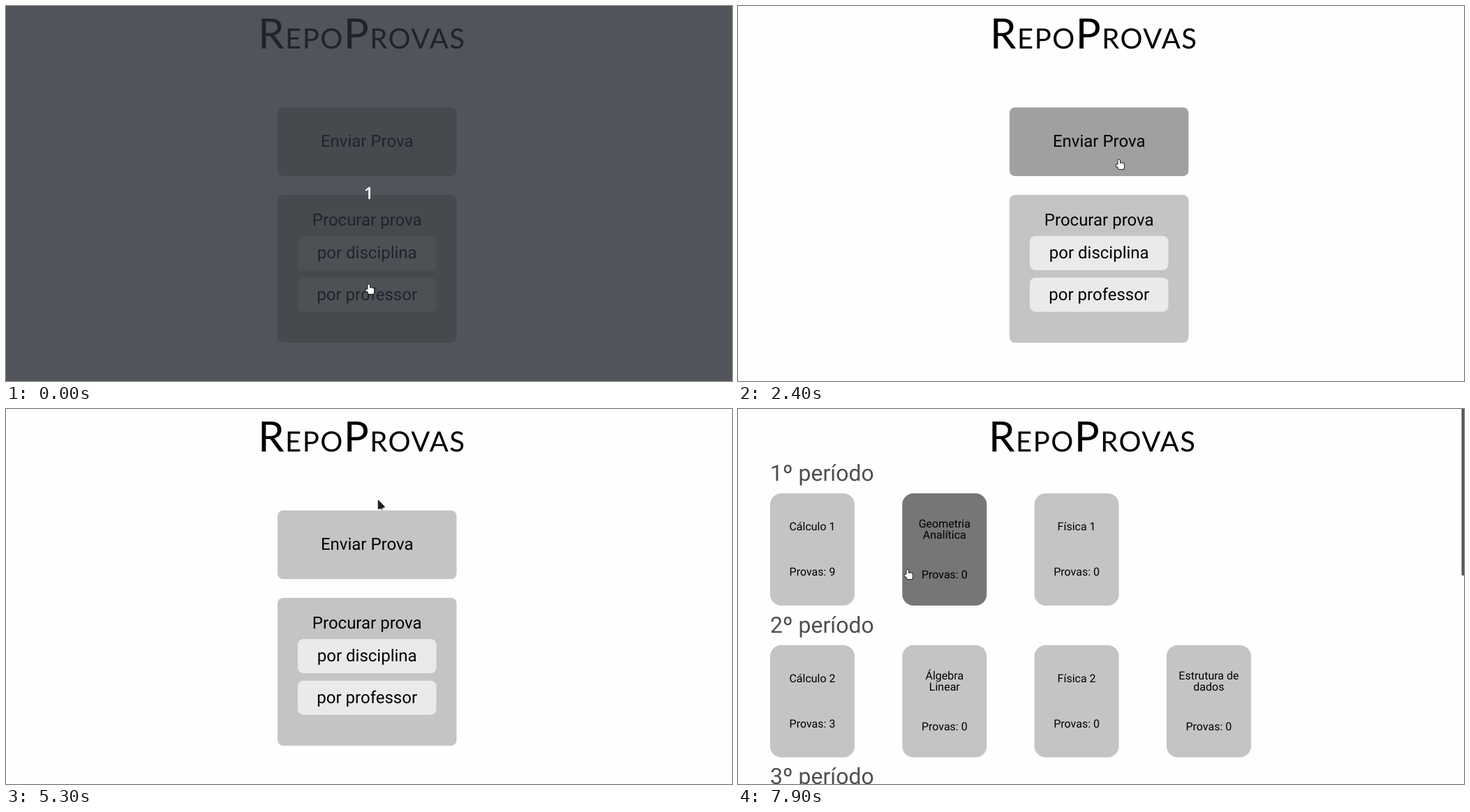
Write an HTML page with a canvas that moves like this. It is 1040 by 538 pixels and loops after 8 s.

```html
<!DOCTYPE html>
<html lang="pt">
<head>
<meta charset="utf-8">
<title>RepoProvas</title>
<style>
  html, body { margin: 0; width: 100%; height: 100%; overflow: hidden; background: #fefefe; }
  canvas { display: block; }
</style>
</head>
<body>
<canvas id="stage" width="1040" height="538"></canvas>
<script>
const ctx = document.getElementById('stage').getContext('2d');
const LOOP = 8000, STEP = 100, MID = 517.2;
const PAPER = '#fefefe', CARD = '#c4c4c2', PILL = '#eaeae8', INK = '#000';
const MENU_HOVER = '#a0a09e', SUBJECT_HOVER = '#767674';

let pointer, hot;

// Pointer strokes: start time, number of steps, destination.
const strokes = [
  [100, 1, 525, 405], [1100, 4, 529, 280], [1600, 4, 537, 350], [2000, 5, 545, 219],
  [3600, 1, 542, 199], [3800, 3, 533, 58], [5200, 8, 531, 351],
  [7200, 3, 504, 328], [7600, 1, 458, 291], [7800, 2, 242, 229]
];

function pointerAt(t) {
  let x = 519, y = 398;
  for (const [start, steps, toX, toY] of strokes) {
    if (t < start) break;
    const k = Math.min(1, ((t - start) / STEP + 1) / steps);
    x += (toX - x) * k;
    y += (toY - y) * k;
  }
  return { x: Math.round(x), y: Math.round(y) };
}

function box(x, y, w, h, radius, fill) {
  ctx.fillStyle = fill;
  ctx.beginPath();
  ctx.roundRect(x, y, w, h, radius);
  ctx.fill();
}

// Text is placed by the vertical centre of its line.
function text(str, x, y, size, { color = INK, align = 'left', font = 'Roboto', weight = 400 } = {}) {
  ctx.font = `${weight} ${size}px "${font}", sans-serif`;
  ctx.fillStyle = color;
  ctx.textAlign = align;
  ctx.fillText(str, x, Math.floor(y + size * 0.34));
}

const centred = (str, x, y, size, color) => text(str, x, y, size, { color, align: 'center' });

function hovered(x, y, w, h) {
  const over = pointer.x >= x && pointer.x < x + w && pointer.y >= y && pointer.y < y + h;
  hot = hot || over;
  return over;
}

function drawTitle(x) {
  ctx.letterSpacing = '1.5px';
  for (const part of ['R', 'EPO', 'P', 'ROVAS']) {
    const size = part.length === 1 ? 60 : 40;
    text(part, x, 61.5 - size * 0.34, size, { font: 'Lato' });
    x += ctx.measureText(part).width;
  }
  ctx.letterSpacing = '0px';
}

function menuButton(label, y, w, h, fill, lit) {
  const x = MID - w / 2;
  const over = hovered(x, y, w, h);
  box(x, y, w, h, 8, over && lit ? MENU_HOVER : fill);
  centred(label, MID, y + h / 2, 24);
}

function drawMenu(lit) {
  drawTitle(361);
  menuButton('Enviar Prova', 145.5, 256.5, 98.5, CARD, lit);
  box(MID - 128.25, 271, 256.5, 212, 8, CARD);
  centred('Procurar prova', MID, 307, 24);
  ['disciplina', 'professor'].forEach((key, i) =>
    menuButton(`por ${key}`, 330 + i * 59.7, 198.5, 49, PILL, lit));
}

function downArrow(x, y) {
  ctx.strokeStyle = '#456b98';
  ctx.lineWidth = 2.2;
  ctx.beginPath();
  ctx.moveTo(x, y - 7);
  ctx.lineTo(x, y + 6);
  ctx.moveTo(x - 6, y);
  ctx.lineTo(x, y + 6);
  ctx.lineTo(x + 6, y);
  ctx.stroke();
}

function field(label, row, w, { x = 294.5, hint, pad } = {}) {
  const y = 138 + row * 63;
  text(label, x, y - 15, 16);
  box(x, y, w, 32, 4, PAPER);
  if (hint) text(hint, x + pad, y + 16, 16, { color: '#999997' });
  else downArrow(x + w - 14, y + 16);
}

function drawForm() {
  const short = 107.5, long = 365.5;
  drawTitle(361);
  box(270, 91, 494, 421, 8, CARD);
  field('URL do pdf', 0, 445.5, { hint: 'Ex.: https://drive.google.com...', pad: 12 });
  field('Ano da prova', 1, short, { hint: 'Ex.: 2020', pad: 8 });
  field('Semestre', 1, 68.5, { x: 590.5 });
  field('Disciplina', 2, long);
  field('Professor', 3, long);
  field('category', 4, short);
  box(MID - 76.75, 430, 153.5, 58, 16, '#09952b');
  centred('Enviar', MID, 459, 24, '#fff');
}

function subjectCard(name, count, x, y) {
  const w = 121, h = 161, mid = x + w / 2;
  const lines = name.split('|');
  const shift = (lines.length - 1) * 4;
  box(x, y, w, h, 16, hovered(x, y, w, h) ? SUBJECT_HOVER : CARD);
  lines.forEach((line, i) => centred(line, mid, y + 48 - shift + i * 16, 16));
  centred(`Provas: ${count}`, mid, y + 113 + shift, 16);
}

function drawSubjects() {
  const terms = [
    ['Cálculo 1', 'Geometria|Analítica', 'Física 1'],
    ['Cálculo 2', 'Álgebra|Linear', 'Física 2', 'Estrutura de|dados'],
    []
  ];
  const counts = { 'Cálculo 1': 9, 'Cálculo 2': 3 };
  drawTitle(359);
  terms.forEach((names, row) => {
    const y = 121 + row * 217.7;
    text(`${row + 1}º período`, 46, y - 28.5, 32, { color: '#4f4f4f' });
    names.forEach((name, col) => subjectCard(name, counts[name] || 0, 46 + col * 189.3, y));
  });
  box(1036.5, -3, 5, 242, 2, '#555');
}

function arrowPointer() {
  const shape = new Path2D('M0.5 0.5V12L9 9.5ZM3.5 8L6 13.5');
  ctx.strokeStyle = '#e4e4e4';
  ctx.lineWidth = 3;
  ctx.stroke(shape);
  ctx.strokeStyle = ctx.fillStyle = '#222';
  ctx.lineWidth = 1.4;
  ctx.stroke(shape);
  ctx.fill(shape);
}

function handPointer() {
  const shape = new Path2D();
  shape.roundRect(-0.5, 1.5, 2.5, 11, 1.2);
  shape.roundRect(-0.5, 6.5, 8.5, 8.5, 2);
  shape.roundRect(-3.5, 8.5, 5, 3, 1.5);
  ctx.strokeStyle = '#222';
  ctx.lineWidth = 2;
  ctx.stroke(shape);
  ctx.fillStyle = '#fff';
  ctx.fill(shape);
}

function drawCountdown() {
  ctx.fillStyle = 'rgba(40, 44, 51, 0.807)';
  ctx.fillRect(0, 0, 1040, 538);
  text('1', 519.5, 269, 24, { color: '#fff', align: 'center', font: 'Open Sans', weight: 600 });
}

function draw(now) {
  const t = Math.floor((now % LOOP) / STEP) * STEP;
  const counting = t < 100;
  pointer = pointerAt(t);
  hot = t >= 4700 && t < 5000;

  ctx.fillStyle = PAPER;
  ctx.fillRect(0, 0, 1040, 538);
  if (t >= 7000) drawSubjects();
  else if (t >= 2700 && t < 5200) drawForm();
  else drawMenu(!counting);
  if (counting) drawCountdown();

  ctx.save();
  ctx.translate(pointer.x, pointer.y);
  if (hot) handPointer();
  else arrowPointer();
  ctx.restore();
}

ctx.lineJoin = 'round';
ctx.textRendering = 'geometricPrecision';
const start = performance.now();
function tick() {
  draw(performance.now() - start);
  requestAnimationFrame(tick);
}
tick();
</script>
</body>
</html>
```
